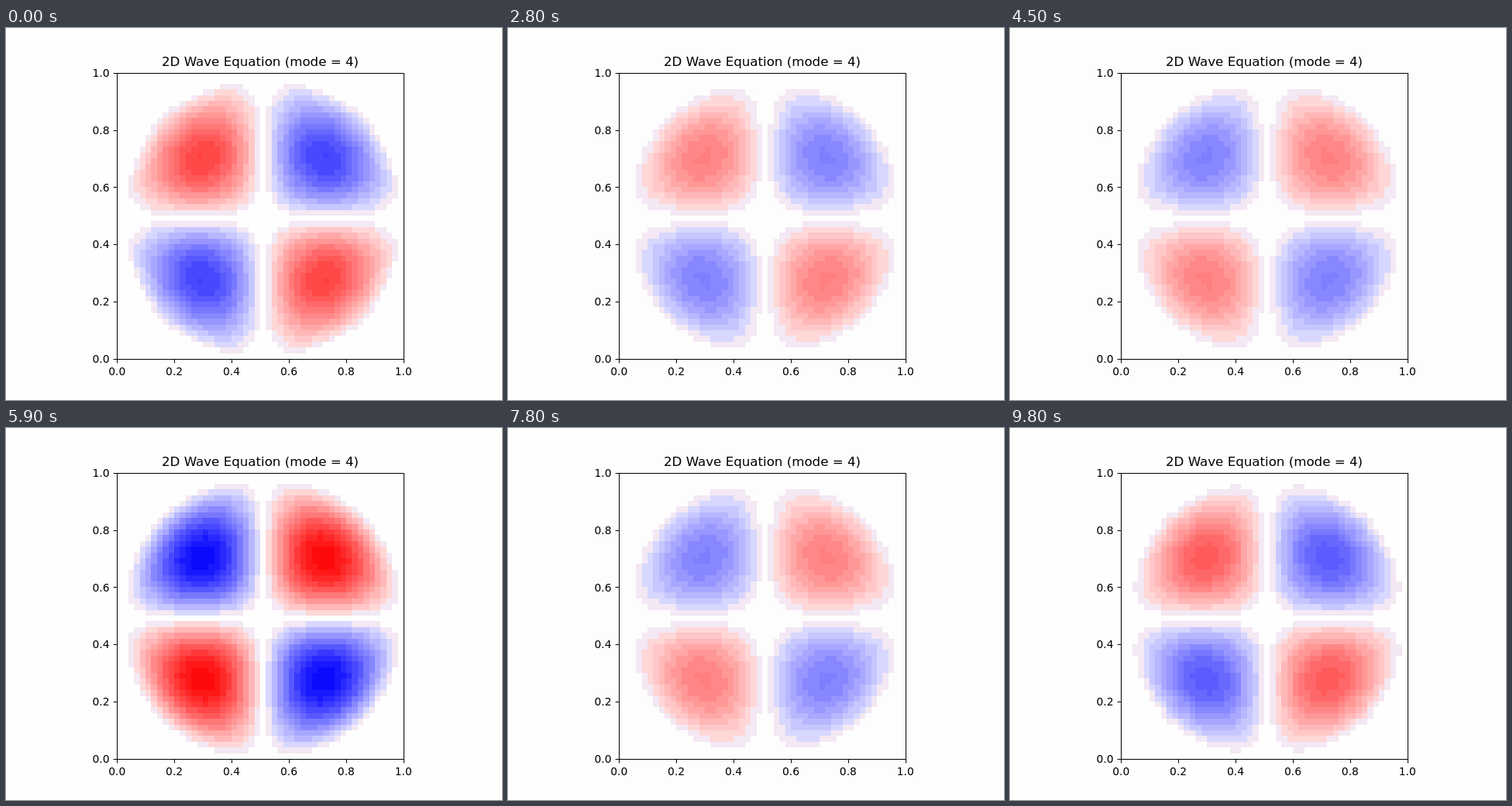
An HTML page with a canvas that plays this animation: 640x480 px, repeating every 9900 ms.

```html
<!DOCTYPE html>
<html lang="en">
<head>
<meta charset="utf-8">
<title>2D Wave Equation</title>
<style>
  html, body { margin: 0; width: 100%; height: 100%; overflow: hidden; background: #fdfdfd; }
  canvas { display: block; }
</style>
</head>
<body>
<canvas id="stage" width="640" height="480"></canvas>
<script>
const ctx = document.getElementById('stage').getContext('2d');
const RADIUS = 25, CELL = 7.4, LEFT = 143, TOP = 57;
const FRAME_MS = 100, FRAMES = 99, LEVELS = 16;

// One quadrant of the membrane's vibration mode: repeated diffusion on the
// grid, held at zero on both axes and on the rim, leaves the lowest mode.
function solveMode() {
  const size = RADIUS + 1, inside = [];
  let u = new Float64Array(size * size), next = u.slice();
  for (let y = 1; y < RADIUS; y++) {
    for (let x = 1; x < RADIUS; x++) {
      const gap = RADIUS ** 2 - x * x - y * y;
      if (gap <= 0) continue;
      const i = y * size + x;
      inside.push(i);
      u[i] = x * y * gap;
    }
  }
  for (let step = 0; step < 2000; step++) {
    for (const i of inside) {
      next[i] = u[i] / 2 + (u[i - 1] + u[i + 1] + u[i - size] + u[i + size]) / 8;
    }
    [u, next] = [next, u];
  }
  const peak = Math.max(...u);
  return (x, y) => Math.sign(x * y) * u[Math.abs(y) * size + Math.abs(x)] / peak;
}

const mode = solveMode();

// Blue-white-red map in 16 bands per side; the top band ends at the amplitude.
function bandColor(value, amplitude) {
  const band = Math.min(LEVELS - 1, Math.floor(Math.abs(value) * LEVELS));
  if (band === 0) return null;
  if (band === 1) return 'rgb(243,232,243)';
  const middle = (band / LEVELS + Math.min((band + 1) / LEVELS, amplitude)) / 2;
  const fade = Math.round(255 * (1 - middle));
  return value > 0 ? `rgb(255,${fade},${fade})` : `rgb(${fade},${fade},255)`;
}

function drawWave(displacement) {
  const amplitude = Math.abs(displacement);
  ctx.fillStyle = amplitude > 0.6 ? '#fefefe' : '#fdfdfd';
  ctx.fillRect(0, 0, 640, 480);
  for (let row = 0; row < 50; row++) {
    const y0 = Math.round(TOP + row * CELL), y1 = Math.round(TOP + (row + 1) * CELL);
    for (let col = 0; col < 50; col++) {
      const color = bandColor(displacement * mode(col - RADIUS, row - RADIUS), amplitude);
      if (!color) continue;
      const x0 = Math.round(LEFT + col * CELL), x1 = Math.round(LEFT + (col + 1) * CELL);
      ctx.fillStyle = color;
      ctx.fillRect(x0, y0, x1 - x0, y1 - y0);
    }
  }
}

function label(text, x, y, align, size) {
  ctx.font = `${size}px "DejaVu Sans", sans-serif`;
  ctx.textAlign = align;
  ctx.fillText(text, x, y);
}

function drawAxes() {
  ctx.strokeStyle = ctx.fillStyle = '#000';
  ctx.lineWidth = 1;
  ctx.strokeRect(143.5, 58.5, 370, 369);
  for (let i = 0; i <= 5; i++) {
    const x = 143.2 + i * 73.92, y = 427.2 - i * 73.92, text = (i / 5).toFixed(1);
    ctx.fillRect(Math.round(x), 428, 1, 4.4);
    ctx.fillRect(138.6, Math.round(y), 4.4, 1);
    label(text, x, 448, 'center', 13.89);
    label(text, 133.5, Math.round(y + 5.1), 'right', 13.89);
  }
  label('2D Wave Equation (mode = 4)', 328, 49, 'center', 16.67);
}

let shown = -1;
function tick() {
  const frame = Math.floor(performance.now() / FRAME_MS) % FRAMES;
  if (frame !== shown) {
    shown = frame;
    drawWave(Math.cos(2 * Math.PI * (frame - 11.5) / 100));
    drawAxes();
  }
  requestAnimationFrame(tick);
}
tick();
</script>
</body>
</html>
```
